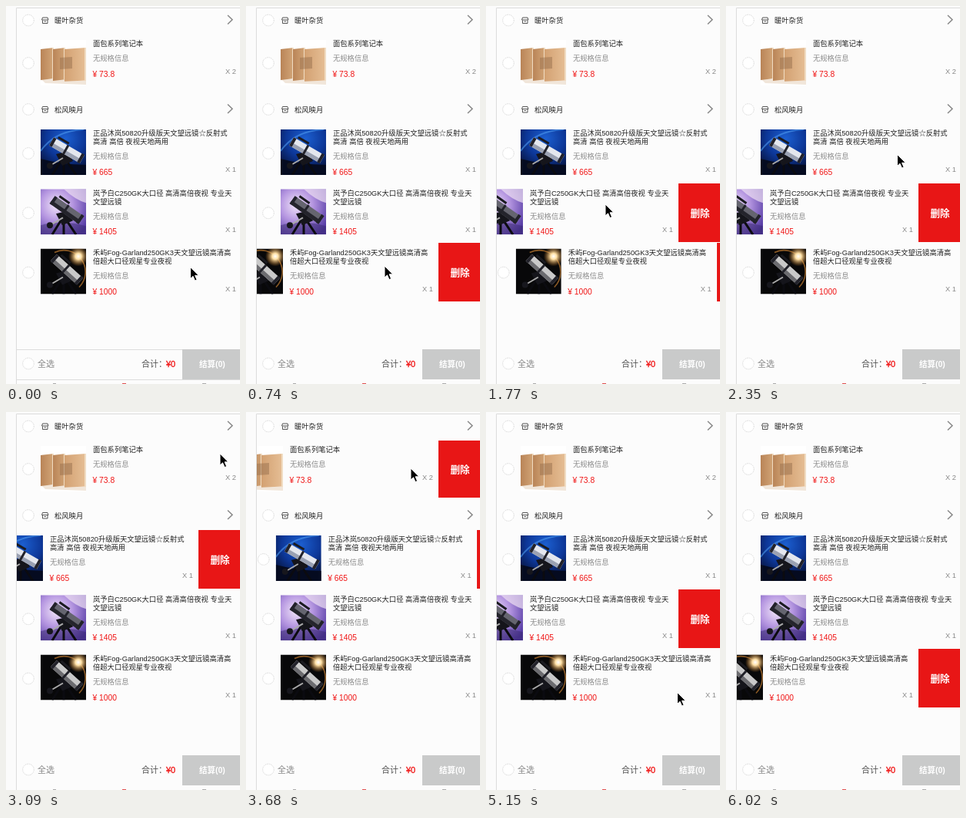
Write an HTML page that moves like this. It is 304 by 490 pixels and loops after 6.32 s.

```html
<!DOCTYPE html>
<html lang="zh-CN">
<head>
<meta charset="utf-8">
<style>
html, body { margin: 0; width: 100%; height: 100%; overflow: hidden; background: #fbfbfb; }
svg { display: block; width: 304px; height: 490px; }
text { font: 9.3px "Liberation Sans", "Noto Sans CJK SC", "Noto Sans CJK", sans-serif; fill: #222; white-space: pre; }
text.dim { fill: #8a8a8a; }
text.price { fill: #f01414; font-size: 10.3px; }
text.count { fill: #888; font-size: 9.3px; }
text.big { font-size: 11px; fill: #555; }
text.pale { fill: #888; }
text.white { fill: #fff; font-weight: bold; }
.check { fill: #fff; stroke: #dadada; stroke-dasharray: 1.6 .9; }
.line { fill: none; stroke: #dcdcdc; }
.block { shape-rendering: crispEdges; }
</style>
</head>
<body>
<svg id="stage" viewBox="0 0 304 490">
  <defs>
    <clipPath id="page"><rect x="14" width="290" height="490"/></clipPath>
    <clipPath id="thumb"><rect width="59" height="59"/></clipPath>
    <linearGradient id="wood"><stop stop-color="#b98457"/><stop offset="1" stop-color="#d3a678"/></linearGradient>
    <linearGradient id="pale"><stop stop-color="#d3a172"/><stop offset="1" stop-color="#e6bf96"/></linearGradient>
    <radialGradient id="blue" cx=".55" cy=".2" r=".85">
      <stop stop-color="#1c5fd0"/><stop offset=".5" stop-color="#0d3798"/><stop offset="1" stop-color="#040a25"/>
    </radialGradient>
    <radialGradient id="violet" cx=".35" cy=".35" r=".8">
      <stop stop-color="#f3e6fa"/><stop offset=".45" stop-color="#b495e0"/><stop offset="1" stop-color="#4f35a0"/>
    </radialGradient>
    <radialGradient id="spark"><stop stop-color="#fff"/><stop offset=".3" stop-color="#ffe2a8"/><stop offset="1" stop-color="#c87820" stop-opacity="0"/></radialGradient>
  </defs>
</svg>
<script>
const stage = document.getElementById('stage');
const LOOP = 6320, STEP = 147, OPEN = 56;

// y is the vertical middle of the text
const text = (x, y, str, cls = '', size = 9.3) =>
  `<text x="${x}" y="${y + size * .37}" class="${cls}">${str}</text>`;
const check = (x, y) => `<circle class="check" cx="${x}" cy="${y}" r="7.3"/>`;

const telescope = (tube, shade, angle) => `
  <path d="M28 38L15 59M32 38L46 59M30 36V59" stroke="#0b0b10" stroke-width="3"/>
  <path d="M20 32L36 28L42 41L28 47Z" fill="#15151b"/>
  <path d="M29 37L12 47" stroke="#aaa" stroke-width="2"/><circle cx="12" cy="47" r="4" fill="#17171d"/>
  <g transform="translate(34 27) rotate(${angle})">
    <rect x="-23" y="-6" width="46" height="12" fill="${tube}"/>
    <rect x="-23" y="1" width="46" height="5" fill="${shade}"/>
    <path d="M-23 -6h4v12h-4ZM19 -6.5h4v13h-4ZM-3 -6.5h3v13h-3Z" fill="#22222a"/>
    <path d="M-18 -9H-2" stroke="#1b1b20" stroke-width="3"/>
  </g>`;

const book = (x, w, fill) => `
  <path d="M${x} 12L${x + w} 10V${50 + x * .08}L${x} ${52 + x * .06}Z" fill="${fill}"/>
  <path d="M${x + w - 2} 10H${x + w}V${50 + x * .08}H${x + w - 2}Z" fill="#f0dcc2"/>`;

const photos = [
  `<rect width="59" height="59" fill="#fff"/>
   <path d="M0 50L59 53V58L6 56Z" fill="#f1e6da"/>
   ${book(0, 17, 'url(#wood)')}${book(16, 16, 'url(#wood)')}${book(31, 28, 'url(#pale)')}
   <path d="M25 23L41 22V37L25 38Z" fill="#97704d" opacity=".5"/>`,
  `<rect width="59" height="59" fill="url(#blue)"/>
   <path d="M0 28Q18 2 56 0" fill="none" stroke="#4b9af0" stroke-width="2" opacity=".6"/>
   <path d="M0 38Q25 45 59 46V59H0Z" fill="#050b20"/>` + telescope('#e4e7ee', '#9aa1b2', 30),
  `<rect width="59" height="59" fill="url(#violet)"/>
   <path d="M30 0L59 0V18Q45 14 30 0Z" fill="#f0e2f4" opacity=".7"/>
   <path d="M0 47Q28 39 59 48V59H0Z" fill="#3a2a70" opacity=".5"/>` + telescope('#65656f', '#24242c', 35),
  `<rect width="59" height="59" fill="#080809"/>
   <path d="M18 5A28 28 0 0 1 50 50" fill="none" stroke="#8b5a25" stroke-width="1.6"/>
   <circle cx="49" cy="10" r="13" fill="url(#spark)"/>` + telescope('#c9c9c9', '#6c6c70', 42)
];

const rows = [
  { y: 36, h: 75, title: ['面包系列笔记本'], price: '73.8', n: 2 },
  { y: 152, h: 77, title: ['正品沐岚50820升级版天文望远镜☆反射式', '高清 高倍 夜视天地两用'], price: '665', n: 1 },
  { y: 229.3, h: 77, title: ['岚予白C250GK大口径 高清高倍夜视 专业天', '文望远镜'], price: '1405', n: 1 },
  { y: 306.5, h: 77, title: ['禾屿Fog-Garland250GK3天文望远镜高清高', '倍超大口径观星专业夜视'], price: '1000', n: 1 }
];

function rowMarkup({ y, h, title, price, n }, i) {
  const extra = (title.length - 1) * 10.8;
  return `<g class="row">
    ${check(29, y + h / 2 + .5)}
    <g transform="translate(45 ${y + 8})" clip-path="url(#thumb)">${photos[i]}</g>
    ${title.map((s, j) => text(113, y + 13 + j * 10.8, s)).join('')}
    ${text(113, y + 32 + extra, '无规格信息', 'dim')}
    ${text(112.5, y + 52.5 + extra, '¥ ' + price, 'price', 10.3)}
    ${text(285, y + 49 + extra, 'X ' + n, 'count')}
    <rect class="block" x="306" y="${y + .5}" width="60" height="${h - 1}" fill="#e81616"/>
    <text x="321.5" y="${y + h / 2 + 5}" class="white" style="font-size:12.6px">删除</text>
  </g>`;
}

const shop = (y, name) => `${check(29, y)}
  <path d="M47.5 ${y - 3.5}H54L55 ${y - .5}H46.5ZM47.5 ${y}V${y + 4}H54V${y}M49.5 ${y + 1.5}H52" fill="none" stroke="#444" stroke-width=".9"/>
  ${text(63, y + .5, name)}
  <path d="M288 ${y - 6.5}L294 ${y - .8}L288 ${y + 5}" fill="none" stroke="#888" stroke-width="1.5"/>`;

stage.innerHTML += `
  <rect x="13" y="2" width="291" height="488" fill="#fcfcfc"/>
  <path class="line" d="M304 2.5H13.5V490"/>
  ${shop(18.5, '暖叶杂货')}${shop(134, '松风映月')}
  <g clip-path="url(#page)">${rows.map(rowMarkup).join('')}</g>
  <path id="rules" class="line" d="M14 445.5H229M14 484.5H304"/>
  ${check(29, 463.5)}
  ${text(41, 464, '全选', 'big pale', 11)}
  ${text(176, 464, '合计：', 'big', 11)}
  <text x="208" y="468" class="price" style="font-size:11px;stroke:#f01414;stroke-width:.3">¥0</text>
  <rect x="229" y="445" width="75" height="39" fill="#c9caca"/>
  <text x="251" y="468" class="white" style="font-size:10.5px">结算(0)</text>
  <path d="M61 489.5H65M255 489.5H260" stroke="#aaa"/>
  <path d="M151 489.5H156" stroke="#e05050"/>
  <path id="cursor" d="M0 0V15L3.5 11.8L6 17.6L8.6 16.5L6.1 10.8H10.8Z" stroke="#fff" stroke-width="1"/>`;

const rowNodes = [...document.querySelectorAll('.row')];
const cursor = document.getElementById('cursor');
const rules = document.getElementById('rules');

// [row, tick when the drag starts]
const swipes = [[3, 0], [2, 9], [1, 16], [0, 22], [2, 31], [3, 35]];
// [tick, x, y]
const path = [
  [0, 239.5, 338.5], [1, 234, 338], [3, 183, 338], [5, 180, 337], [8, 211, 257], [9, 211, 257],
  [10, 206.5, 257], [12, 155, 257], [13, 152, 256], [16, 222.5, 192.5], [17, 217, 192], [19, 166, 190],
  [20, 205, 135], [21, 278, 54], [22, 270, 70], [23, 265, 71], [25, 214, 73], [27, 212, 76],
  [31, 263.5, 272], [32, 259, 271], [34, 208, 270], [35, 248.5, 363.5], [36, 243, 363],
  [38, 192, 361], [40, 198, 455], [41, 202, 500]
];

const ramp = (k, start) => Math.min(1, Math.max(0, (k - start) / 3));

function offset(row, k) {
  let sum = 0;
  swipes.forEach(([r, start], i) => {
    if (r !== row) return;
    const next = swipes[i + 1];
    const closing = next ? 1 - (1 - ramp(k, next[1] + 1)) ** 2 : 0;
    sum += ramp(k, start) ** 2.2 * (1 - closing);
  });
  return -OPEN * sum;
}

function cursorAt(k) {
  const i = Math.max(1, path.findIndex(p => p[0] >= k));
  const [a, ax, ay] = path[i - 1], [b, bx, by] = path[i];
  const f = (k - a) / (b - a);
  return [ax + (bx - ax) * f, ay + (by - ay) * f];
}

function draw() {
  const t = performance.now() % LOOP;
  const k = Math.min(41, Math.floor((t + 10) / STEP));
  rowNodes.forEach((node, i) => node.setAttribute('transform', `translate(${offset(i, k)} 0)`));
  cursor.setAttribute('transform', `translate(${cursorAt(k)})`);
  rules.style.display = k ? 'none' : '';
  requestAnimationFrame(draw);
}
draw();
</script>
</body>
</html>
```
